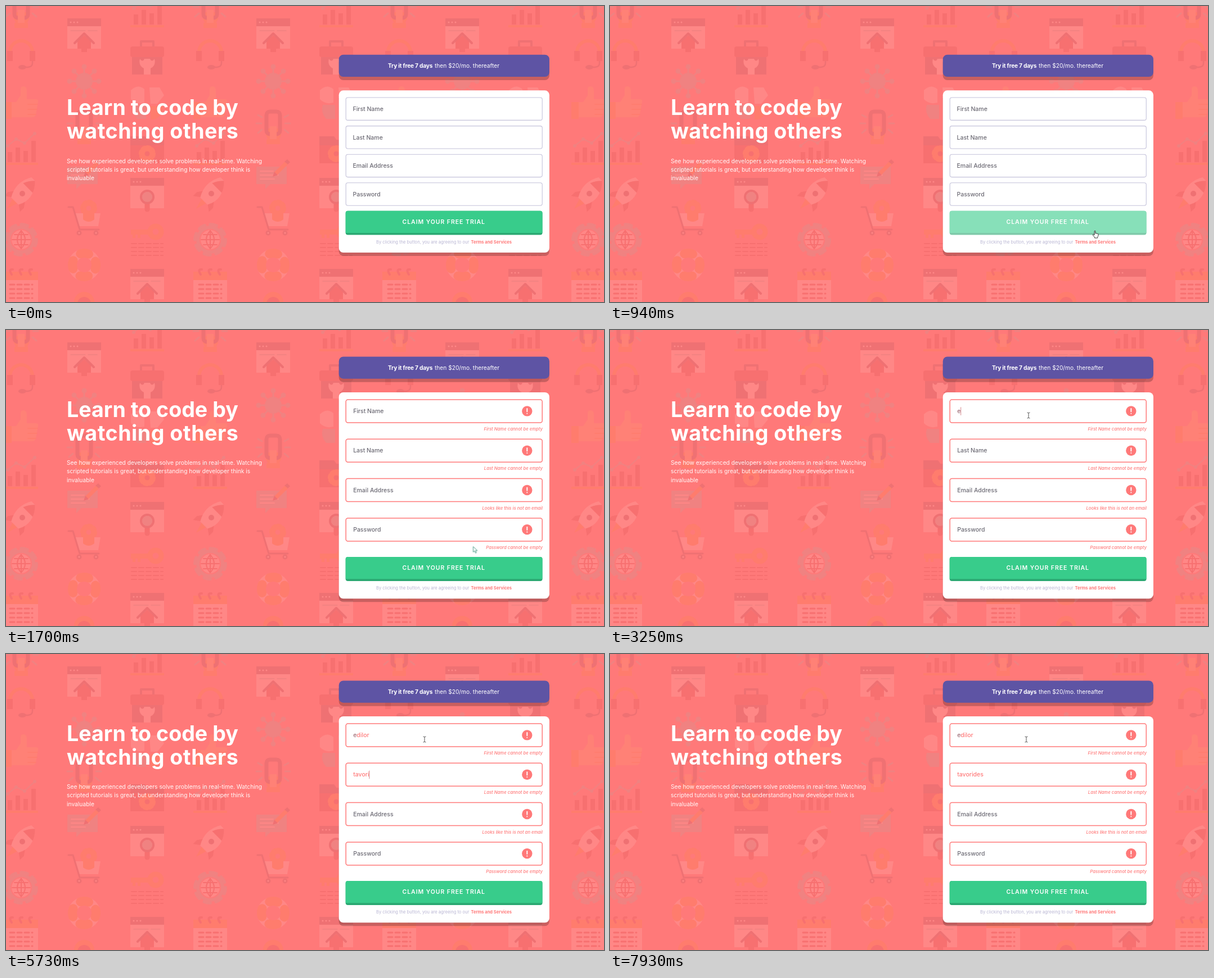
An HTML page that plays this animation: 1063x527 px, repeating every 8 s.

```html
<!DOCTYPE html>
<html lang="en">
<head>
<meta charset="utf-8">
<title>Sign-up form</title>
<style>
html, body { margin: 0; width: 100%; height: 100%; overflow: hidden; background: #ff7979; }
svg { display: block; width: 1063px; height: 527px; font-family: Inter, "Open Sans", sans-serif; }
text { white-space: pre; }

/* background icons */
.p { fill: #ff8786; } .d { fill: #ef7173; } .g { fill: #f08281; } .o { fill: #ff7c6d; } .r { fill: #f77070; } .h { fill: #ff8176; }
.ln { fill: none; stroke-linecap: round; stroke-linejoin: round; }
.sp { stroke: #ff8786; } .sd { stroke: #ef7173; } .sg { stroke: #f08281; } .so { stroke: #ff7c6d; } .sr { stroke: #f77070; }

/* page */
.h1 { font-size: 37.6px; font-weight: 700; fill: #fff; }
.loose { letter-spacing: .5px; }
.intro { font-size: 10.25px; fill: #fff; fill-opacity: .95; }
.offer { font-size: 10.2px; fill: #fff; }
.strong { font-weight: 700; letter-spacing: -.2px; }
.label { font-size: 10.5px; font-weight: 500; fill: #6c6a74; }
.value { font-size: 10.5px; font-weight: 500; fill: #ff7979; }
.dim { fill: #a06f78; }
.cta { font-size: 10.5px; font-weight: 600; letter-spacing: .95px; fill: #fff; }
.terms { font-size: 7.6px; fill: #bab7d4; }
.link { font-size: 7.5px; font-weight: 700; fill: #ff7979; }
.error { font-size: 7.7px; font-weight: 500; font-style: italic; fill: #ff7979; text-anchor: end; }
.shade { fill: #000; fill-opacity: .21; }

/* timeline */
#plain, #invalid, #plain .btn, #cursor, .arrow, .hand, .beam { animation: 8s step-end infinite; }
#plain { animation-name: plain; }
#invalid { animation-name: invalid; }
#plain .btn { animation-name: hover; }
#cursor { animation-name: move; }
.arrow { animation-name: arrow; }
.hand { animation-name: hand; }
.beam { animation-name: beam; }
@keyframes plain { 0% { opacity: 1; } 21.25%, 100% { opacity: 0; } }
@keyframes invalid { 0% { opacity: 0; } 21.25%, 100% { opacity: 1; } }
@keyframes hover { 0% { opacity: 1; } 10.875%, 100% { opacity: .6; } }
@keyframes move {
  0% { transform: translate(1075px, 535px); }
  6.5% { transform: translate(1053px, 517px); animation-timing-function: steps(3); }
  9.125% { transform: translate(982px, 455px); animation-timing-function: steps(3); }
  11.75% { transform: translate(862px, 400px); animation-timing-function: steps(5); }
  16.125% { transform: translate(836px, 389px); animation-timing-function: steps(4); }
  19.5% { transform: translate(830.5px, 385.5px); }
  27.125% { transform: translate(826px, 365px); animation-timing-function: steps(4); }
  30.6% { transform: translate(785px, 255px); animation-timing-function: steps(4); }
  34% { transform: translate(746px, 156px); }
  34.875% { transform: translate(744px, 152px); }
  85% { transform: translate(742px, 152px); }
  85.875%, 100% { transform: translate(740px, 152px); }
}
@keyframes arrow {
  0% { opacity: 1; stroke: #222; }
  10.875% { opacity: 0; stroke: #222; }
  19.5% { opacity: 1; stroke: #222; }
  21.25% { opacity: 1; stroke: #4b9a86; }
  28.2%, 100% { opacity: 0; stroke: #4b9a86; }
}
@keyframes hand { 0% { opacity: 0; } 10.875% { opacity: 1; } 19.5%, 100% { opacity: 0; } }
@keyframes beam { 0% { opacity: 0; } 28.2%, 100% { opacity: 1; } }
</style>
</head>
<body>
<svg viewBox="0 0 1063 527">
  <defs>
    <g id="window">
      <path class="p" d="M-30 14h60v40h-60z"/>
      <path class="d" d="M-30 0h60v14h-60z"/>
      <path class="ln sp" stroke-width="3" d="M-24 7h0m6 0h0m6 0h0"/>
    </g>
    <g id="home">
      <use href="#window"/>
      <path class="ln sg" d="M-24 22h26m5 0h16" stroke-width="1.5"/>
      <path class="r" d="M-12 54V41L0 30 12 41v13H5v6h-10v-6z"/>
      <path class="ln sd" stroke-width="4" stroke-linecap="butt" d="M-17 44 0 27 17 44"/>
    </g>
    <g id="chart">
      <path class="r" d="M-24 38h8v18h-8zm14-8h8v26h-8zm14 6h8v20H4zm14-18h8v38h-8z"/>
      <path class="o" d="M-30 57h60v4h-60z"/>
      <path class="ln sg" stroke-width="2" d="M-24 27-9 15 6 22 24 5"/>
      <path class="ln sg" stroke-width="6" d="M-24 27h0M-9 15h0M6 22h0M24 5h0"/>
    </g>
    <g id="phone">
      <path class="ln sg" stroke-width="3" d="M-20 14-27 10M-21 25h-9M-20 36l-7 6M20 14l7-4M21 25h9M20 36l7 6"/>
      <path class="o" d="M-13 34h27v12l-4 8H-9l-4-8z"/>
      <rect class="ln sd" x="-12" y="4" width="24" height="40" rx="6" stroke-width="7"/>
      <path class="h" d="M-6 30H6v24H-6z"/>
      <path class="o" d="M-12 53h24v9h-24z"/>
    </g>
    <g id="gear">
      <circle class="ln so" r="12" stroke-width="6" stroke-linecap="butt" stroke-dasharray="4.7"/>
      <circle class="ln so" r="8" stroke-width="7"/>
    </g>
    <g id="icons">
      <g transform="translate(27)">
        <use href="#phone" y="-23"/>
        <path class="ln so" stroke-width="6" d="M-20 88V82A20 20 0 0 1 20 82v6"/>
        <path class="ln sd" stroke-width="2.5" d="M20 94v8q0 6-8 7H3"/>
        <path class="r" d="M-25 80h10v18h-10zM15 80h10v18H15z"/>
        <ellipse class="d" cx="2" cy="109" rx="7" ry="4"/>
        <path class="h" d="M-18 171h9l8-12v-11q0-5 5-5 6 0 6 8v15h16q5 0 4 5l-4 22q-1 5-6 5H-18z"/>
        <path class="o" d="M-30 171h13v30h-13z"/>
        <path class="ln so" stroke-width="1.5" d="M12 175h17M12 184h16M12 193h14"/>
        <use href="#chart" y="222"/>
        <g transform="translate(2 334) rotate(45)">
          <path class="o" d="M-6 18H6L0 38z"/>
          <path class="r" d="M-10 2-20 16v10l11-8H9l11 8V16L10 2z"/>
          <path class="p" d="M0-32q24 26 9 51H-9q-15-25 0-51z"/>
          <path class="r" d="M0-32q9 9 12 18h-24q3-9 12-18z"/>
          <circle class="d" r="5"/>
        </g>
        <g transform="translate(0 416)">
          <circle class="ln sg" r="27" stroke-width="6" stroke-linecap="butt" stroke-dasharray="10.6"/>
          <circle class="ln sg" r="22" stroke-width="6"/>
          <circle class="p" r="17"/>
          <path class="ln sr" stroke-width="2" d="M-16 0h32M0-16v32M-12-9h24M-12 9h24M0-16q-14 16 0 32 14-16 0-32"/>
        </g>
        <path class="p" d="M-30 486h60v41h-60z"/>
        <path class="o" d="M-30 473h60v15h-60z"/>
        <path class="ln sr" stroke-width="4" d="M-17 478q-6-10 2-9M0 478q-6-10 2-9M17 478q-6-10 2-9"/>
        <path class="ln sr" stroke-width="3" stroke-linecap="butt" stroke-dasharray="8 5" d="M-20 496h40M-20 504h40M-20 512h40M-20 520h40"/>
      </g>
      <g transform="translate(139)">
        <use href="#home" y="22"/>
        <g transform="translate(0 134)">
          <path class="ln sg" stroke-width="3" d="M-26 0h52M0-26v52M-18-18l36 36M18-18l-36 36"/>
          <path class="ln sg" stroke-width="9" d="M-26 0h0M26 0h0M0-26h0M0 26h0M-18-18h0M18 18h0M18-18h0M-18 18h0"/>
          <circle class="g" r="15"/>
        </g>
        <use href="#phone" y="184"/>
        <path class="g" d="M-30 286h54v31H-5l-9 9v-9h-16z"/>
        <path class="ln sp" stroke-width="2" d="M-23 294H0M-23 301h32M-23 308h25"/>
        <path class="ln so" stroke-width="7" stroke-linecap="butt" d="M5 298 25 278"/>
        <path class="d" d="m2 295 6 6-9 3zM25 273l5 5-4 4-6-5z"/>
        <use href="#gear" x="8" y="360"/>
        <path class="p" d="M-17 369h46l-4 23h-36z"/>
        <path class="o" d="M-2 366h20v14q-10 8-20 0z"/>
        <path class="ln sd" stroke-width="3" d="M-28 358h8l12 40h34"/>
        <path class="ln sd" stroke-width="9" d="M-9 404h0M21 404h0"/>
        <path class="ln sp" stroke-width="3" d="M-9 404h0M21 404h0"/>
        <circle class="ln sp" cy="461" r="21" stroke-width="15"/>
        <circle class="ln so" cy="461" r="21" stroke-width="16" stroke-linecap="butt" stroke-dasharray="15 18" stroke-dashoffset="7.5"/>
        <circle class="o" cy="527" r="18"/><circle class="r" cy="530" r="12"/>
      </g>
      <g transform="translate(251)">
        <use href="#chart" y="-23"/>
        <path class="ln sd" stroke-width="4" d="M-11 73V63h22v10"/>
        <rect class="r" x="-30" y="72" width="60" height="19" rx="4"/>
        <path class="d" d="M-27 91h54v31h-54z"/>
        <path class="p" d="M-13 94q5 7 8 0h10q3 7 8 0 3 12-7 17v11h-12v-11q-10-5-7-17z"/>
        <path class="p" d="M-29 150q12-12 24-2v24q-14 4-24-6zM4 145h18l8 14-12 15H6z"/>
        <path class="g" d="M-24 176h22v25h-16q-10-11-6-25z"/>
        <path class="o" d="M6 178h22q-2 20-16 24H6z"/>
        <path class="r" d="M-30 238h60v42h-60z"/>
        <path class="d" d="M-30 232h26l5 7h29v9h-60z"/>
        <use href="#gear" y="263"/>
        <use href="#window" y="306"/>
        <path class="ln sr" stroke-width="9" stroke-linecap="butt" d="M0 352v10"/>
        <circle class="ln sd" cy="340" r="11" stroke-width="4"/>
        <circle class="g" cy="340" r="9"/>
        <path class="o" d="M-29 398H6v9h-18v6h-5v-6h-4v6h-5v-6h-3z"/>
        <circle class="ln so" cx="15" cy="402" r="10" stroke-width="9"/>
        <path class="ln sr" stroke-width="2" stroke-dasharray="9 4" d="M-28 423h56M-28 430h56M-28 437h56M-28 444h56"/>
        <use href="#home" y="468"/>
      </g>
    </g>
  </defs>

  <use href="#icons"/><use href="#icons" x="336"/><use href="#icons" x="672"/><use href="#icons" x="1008"/>
  <g id="plain"></g>
  <g id="invalid"></g>
  <g id="cursor">
    <path class="arrow" fill="#fff" stroke-width="1" stroke-linejoin="round" d="M0 0v10l2.4-2.2 1.7 3.9 1.7-.8-1.7-3.7h3.2z"/>
    <path class="hand" fill="#fff" stroke="#222" stroke-width=".9" stroke-linejoin="round"
      d="M-.9.8Q0-.8.9.8V5q1-.8 1.8.2 1-.7 1.8.4 1.5-.5 1.6 1.2 0 3-1.4 4.7V13H-.5v-1.3L-3.6 8q-.5-1.7 1-1.4l1.7 1.2z"/>
    <path class="beam" fill="none" stroke="#555" d="M-2.5-5q2 0 2.5 1 .5-1 2.5-1M0-4v8M-2.5 5q2 0 2.5-1 .5 1 2.5 1"/>
  </g>
</svg>
<script>
const labels = ['First Name', 'Last Name', 'Email Address', 'Password'];
const errors = ['First Name cannot be empty', 'Last Name cannot be empty',
  'Looks like this is not an email', 'Password cannot be empty'];

const text = (x, y, cls, s) => `<text x="${x}" y="${y}" class="${cls}">${s}</text>`;
const box = (y, h, fill) =>
  `<rect x="591.7" y="${y + 6}" width="374.2" height="${h}" rx="8" class="shade"/>
   <rect x="591.7" y="${y}" width="374.2" height="${h}" rx="8" fill="${fill}"/>`;

function field(i, bad) {
  const y = bad ? 124 + 70.3 * i : 163 + 50.6 * i;
  const frame = `<rect x="604.2" y="${y}" width="349" height="${bad ? 41 : 40.4}" rx="3.5" fill="#fff"
    stroke="${bad ? '#ff7979' : '#c4c2da'}" stroke-width="${bad ? 1.5 : 1.1}"/>`;
  const label = text(bad ? 617.2 : 616.5, y + 23.9, 'label', labels[i]);
  if (!bad) return frame + label;
  return frame + label + text(617.2, y + 23.9, 'value', '') +
    `<rect class="caret" y="${y + 13.3}" width="1" height="14.5" fill="#d58a8f"/>
     <circle cx="926.3" cy="${y + 20.4}" r="9.2" fill="#ff7979"/>
     <path d="M926.3 ${y + 16}v5.2m0 3.4v.2" stroke="#fff" stroke-width="1.9" stroke-linecap="round"/>` +
    text(954, y + 55, 'error', errors[i]);
}

function page(bad) {
  const up = bad ? -39.3 : 0, down = -up;
  const top = `<g transform="translate(0 ${up})">` +
    text(108, 194, 'h1', 'Learn to code by') + text(108, 236.3, 'h1 loose', 'watching others') +
    text(108, 279.5, 'intro', 'See how experienced developers solve problems in real-time. Watching') +
    text(108, 294.8, 'intro', 'scripted tutorials is great, but understanding how developer think is') +
    text(108, 310, 'intro', 'invaluable') +
    box(86.7, 39.3, '#5e54a4') +
    text(679, 110.2, 'offer strong', 'Try it free 7 days') +
    text(762, 110.2, 'offer', 'then $20/mo. thereafter') + '</g>';
  const bottom = `<g transform="translate(0 ${down})"><g class="btn">
    <rect x="603.7" y="364.8" width="349.8" height="42.8" rx="4" fill="#2ba872"/>
    <path d="M603.7 404v-35.2q0-4 4-4h341.8q4 0 4 4V404z" fill="#38cc8b"/>` +
    text(704.5, 388, 'cta', 'CLAIM YOUR FREE TRIAL') + '</g>' +
    text(658, 422.6, 'terms', 'By clicking the button, you are agreeing to our') +
    text(826.5, 422.6, 'link', 'Terms and Services') + '</g>';
  return top + box(150.3 + up, 288.7 + 2 * down, '#fff') +
    labels.map((_, i) => field(i, bad)).join('') + bottom;
}

const find = s => document.querySelector(s), all = s => [...document.querySelectorAll(s)];
find('#plain').innerHTML = page(false);
find('#invalid').innerHTML = page(true);

// each entry: time, focused field, its text
const keys = [[2790, 0, ''], [3250, 0, 'e'], [4250, 1, ''], [4650, 1, 'y'], [5000, 1, ''],
  [5120, 1, 't'], [5250, 1, 'ta'], [6340, 2, '']];
const typeOut = (start, gap, id, word, from) => {
  for (let n = from; n <= word.length; n++) keys.push([start + gap * (n - from), id, word.slice(0, n)]);
};
typeOut(3520, 100, 0, 'edilor', 2);
typeOut(5400, 110, 1, 'tavorides', 3);
keys.sort((a, b) => a[0] - b[0]);

const hints = all('#invalid .label'), values = all('.value'), carets = all('.caret');
const clock = find('#cursor').getAnimations()[0];
const LEAD = 25; // scripted changes show one paint later than the CSS ones

function draw() {
  const t = ((clock.currentTime || 0) + LEAD) % 8000;
  const done = keys.filter(k => k[0] <= t), last = done[done.length - 1];
  const content = ['', '', '', ''];
  done.forEach(([, id, s]) => content[id] = s);
  content.forEach((s, i) => {
    const el = values[i];
    el.innerHTML = s && i === 0 ? `<tspan class="dim">${s[0]}</tspan>${s.slice(1)}` : s;
    hints[i].style.display = s ? 'none' : '';
    const lit = last && last[1] === i && Math.floor((t - last[0]) / 530) % 2 === 0;
    carets[i].style.display = lit ? '' : 'none';
    if (lit) carets[i].setAttribute('x', 617 + (s ? el.getComputedTextLength() : 0));
  });
  requestAnimationFrame(draw);
}
draw();
</script>
</body>
</html>
```
